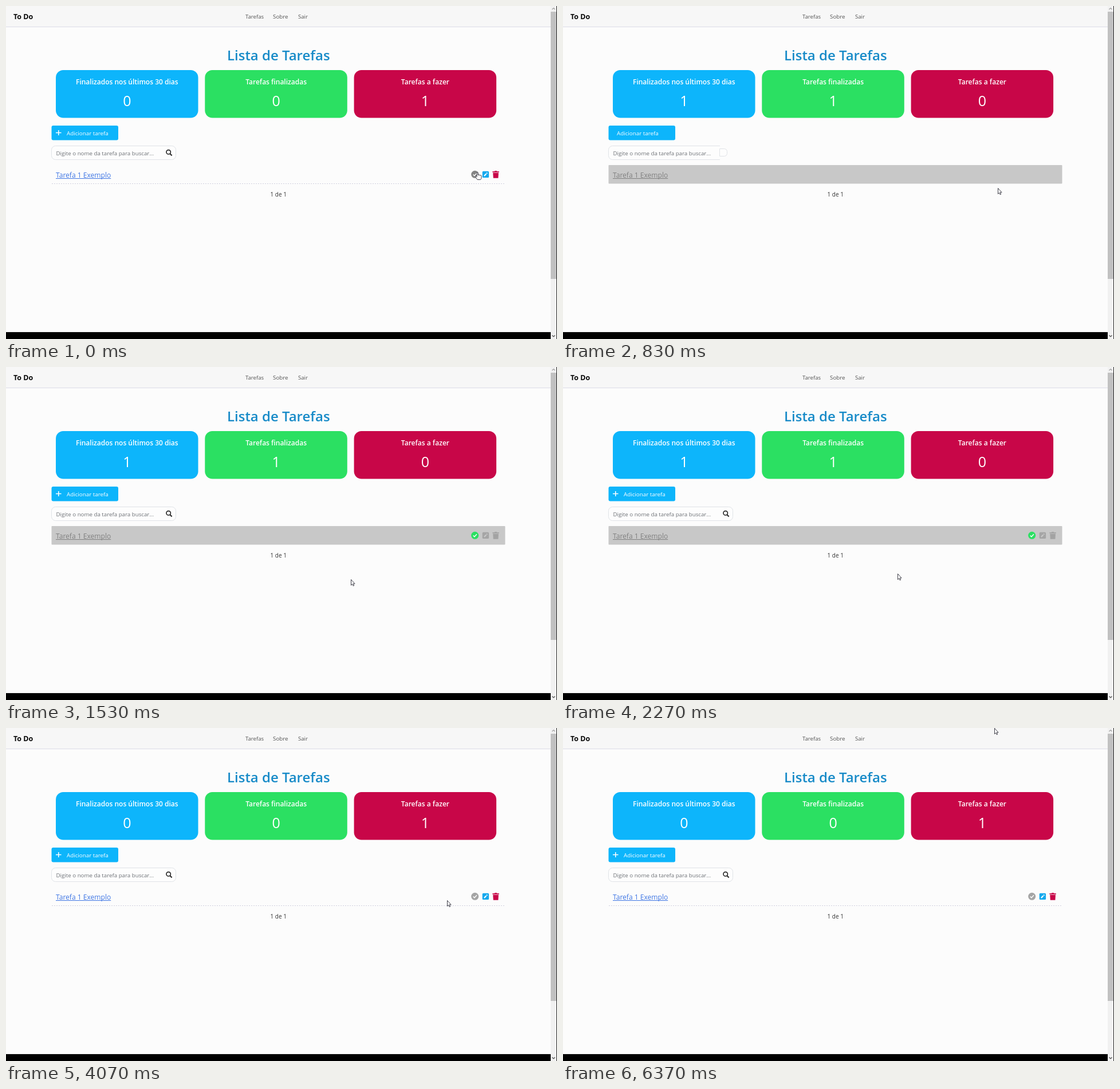
An HTML page with a canvas that plays this animation: 962 by 582 pixels, repeating every 7.41 s.

```html
<!DOCTYPE html>
<html lang="pt">
<head>
<meta charset="utf-8">
<title>To Do</title>
<style>
html, body { margin: 0; width: 100%; height: 100%; overflow: hidden; background: #fcfcfc; }
canvas { display: block; }
</style>
</head>
<body>
<canvas id="stage" width="962" height="582"></canvas>
<script>
const ctx = document.getElementById('stage').getContext('2d');
const LOOP = 7410;
const BLUE = '#0db5fb', GREEN = '#2be062', RED = '#c80648';

// Pointer path: time, x, y of the tip
const path = [
  [0, 823, 290], [30, 823, 290], [170, 819, 291], [600, 819, 291],
  [830, 759, 318], [1230, 623, 367], [1330, 609, 370], [1370, 609, 370],
  [1530, 602, 371], [2030, 602, 371], [2270, 584, 361], [2520, 612, 350],
  [2770, 712, 322], [2800, 716, 321], [3170, 818, 291], [3900, 818, 291],
  [4070, 770, 301], [4350, 684, 328], [4630, 642, 343], [4670, 642, 343],
  [4730, 639, 343], [4970, 639, 343], [5150, 690, 150], [5330, 753, 0],
  [LOOP, 753, 0]
];

function pointerAt(t) {
  let i = 1;
  while (i < path.length - 1 && path[i][0] <= t) i++;
  const [t0, x0, y0] = path[i - 1], [t1, x1, y1] = path[i];
  const k = (t - t0) / (t1 - t0);
  return [Math.round(x0 + (x1 - x0) * k), Math.round(y0 + (y1 - y0) * k)];
}

const within = (t, a, b) => t >= a && t < b;

function rect(x, y, w, h, color) {
  ctx.fillStyle = color;
  ctx.fillRect(x, y, w, h);
}

function box(x, y, w, h, r, fill, stroke) {
  ctx.beginPath();
  ctx.roundRect(x, y, w, h, r);
  if (fill) { ctx.fillStyle = fill; ctx.fill(); }
  if (stroke) { ctx.strokeStyle = stroke; ctx.lineWidth = 1; ctx.stroke(); }
}

function line(points, color, width) {
  ctx.beginPath();
  points.forEach(([x, y]) => ctx.lineTo(x, y));
  ctx.strokeStyle = color;
  ctx.lineWidth = width;
  ctx.stroke();
}

function circle(x, y, r) {
  ctx.beginPath();
  ctx.arc(x, y, r, 0, Math.PI * 2);
}

function text(str, x, y, size, color, weight = 400, align = 'left') {
  ctx.font = `${weight} ${size}px "Open Sans", "Noto Sans", sans-serif`;
  ctx.textAlign = align;
  ctx.fillStyle = color;
  ctx.fillText(str, x, y);
  return ctx.measureText(str).width;
}

function drawHeader() {
  rect(0, 0, 951, 36, '#f7f7f7');
  rect(0, 36, 951, 1, '#dcdce8');
  text('To Do', 13, 23, 12.5, '#080808', 700);
  text('Tarefas', 418, 22, 9.6, '#555');
  text('Sobre', 466, 22, 9.8, '#555');
  text('Sair', 510, 22, 9.6, '#555');
}

function drawCard(x, color, label, value) {
  box(x, 112, 248.5, 83.5, 13, color);
  text(label, x + 124.3, 137, 12, '#fff', 600, 'center');
  text(value, x + 124.3, 175, 25, '#fff', 400, 'center');
}

function drawButton(icons) {
  box(79.5, 209, 116.5, 25.5, 3, BLUE);
  text('Adicionar tarefa', icons ? 106 : 94, 225.5, 9.8, '#fff');
  if (icons) {
    line([[87, 221.5], [96.5, 221.5]], '#fff', 1.5);
    line([[91.75, 217], [91.75, 226]], '#fff', 1.5);
  }
}

function drawSearch(icons) {
  const edge = '#e0e3e7';
  if (icons) {
    box(79.5, 244.5, 217, 24, 7, '#fdfdfd', edge);
    circle(283.7, 255.3, 3.7);
    ctx.strokeStyle = '#2c2c2c';
    ctx.lineWidth = 1.7;
    ctx.stroke();
    line([[286.3, 258], [289.6, 261.4]], '#2c2c2c', 2.1);
  } else {
    ctx.save();
    ctx.beginPath();
    ctx.rect(70, 240, 204, 34);
    ctx.clip();
    box(79.5, 244.5, 217, 24, 7, '#fdfdfd', edge);
    ctx.restore();
    box(273.5, 249.5, 13, 13, [0, 5, 5, 0], '#fdfdfd', edge);
  }
  text('Digite o nome da tarefa para buscar...', 87.5, 260.5, 9.72, '#6d7176');
}

function drawRowIcons(done, hover) {
  const back = done ? '#c8c8c8' : '#fff';
  circle(818.7, 294.3, 6.5);
  ctx.fillStyle = done ? (hover ? '#20ab4c' : GREEN) : (hover ? '#858585' : '#a5a5a5');
  ctx.fill();
  line([[815.7, 294.5], [817.9, 296.7], [821.9, 292.3]], '#fff', 1.5);

  box(831.7, 288.7, 11.4, 11.4, 1.7, done ? '#a5a5a5' : '#14a9ee');
  line([[834.9, 296.9], [838.5, 293.3]], back, 2.1);
  line([[839.2, 292.6], [840.3, 291.5]], back, 2.1);

  const bin = done ? '#a3a3a3' : RED;
  rect(849.4, 289, 11.4, 1.7, bin);
  rect(853, 288.1, 4.2, 1.2, bin);
  ctx.beginPath();
  ctx.moveTo(850.2, 291.5);
  ctx.lineTo(860, 291.5);
  ctx.lineTo(859.4, 300.8);
  ctx.lineTo(850.8, 300.8);
  ctx.closePath();
  ctx.fillStyle = bin;
  ctx.fill();
}

function drawRow(done, icons, hover) {
  if (done) {
    box(79.5, 278, 792, 32.5, 1, '#c8c8c8');
  } else {
    ctx.setLineDash([2, 2]);
    line([[80, 310.5], [871, 310.5]], '#d0d0de', 1);
    ctx.setLineDash([]);
  }
  const color = done ? '#808080' : '#3f76e4';
  const width = text('Tarefa 1 Exemplo', 87, 299.5, 12.06, color);
  rect(87, 301, width, 1, color);
  if (icons) drawRowIcons(done, hover);
  text('1 de 1', 475.7, 333, 10, '#333', 400, 'center');
}

function drawFrame() {
  rect(0, 569, 951, 1, '#eeeeee');
  rect(0, 570, 951, 12, '#000');
  rect(951, 0, 10, 582, '#f1f1f1');
  rect(951, 10, 10, 467, '#c1c1c1');
  rect(961, 0, 1, 582, '#262626');
  line([[953.5, 6], [956, 3.5], [958.5, 6]], '#a0a0a0', 1.2);
  line([[953.5, 575.5], [956, 578], [958.5, 575.5]], '#505050', 1.2);
}

function drawShape(x, y, d) {
  ctx.save();
  ctx.translate(x, y);
  const shape = new Path2D(d);
  ctx.fillStyle = '#fff';
  ctx.fill(shape);
  ctx.strokeStyle = '#2d2d38';
  ctx.lineWidth = 0.9;
  ctx.lineJoin = 'round';
  ctx.stroke(shape);
  ctx.restore();
}

function drawPointer(x, y, hand) {
  drawShape(x, y, hand
    ? 'M-1 1Q0-.5 1 1V5.5Q2 4.3 3 5.6Q4.2 4.7 5 6Q7 5.2 7 7.5V10Q7 12 5.5 13.5H0L-3.5 8.5Q-3.8 6.8-2.3 7.2L-1 8.5Z'
    : 'M.5 .5V10.5L2.7 8.4L4.2 11.7L5.7 11L4.2 7.8H7.1Z');
}

function draw(t) {
  const done = within(t, 700, 3910);
  const icons = !within(t, 700, 870) && !within(t, 3910, 4030);
  const [x, y] = pointerAt(t);
  const hover = Math.hypot(x - 818.7, y - 294.3) < 7.5;

  rect(0, 0, 962, 582, '#fcfcfc');
  drawHeader();
  text('Lista de Tarefas', 475.8, 95, 24, '#188bc8', 600, 'center');
  const finished = done ? '1' : '0';
  drawCard(87, BLUE, 'Finalizados nos últimos 30 dias', finished);
  drawCard(347.3, GREEN, 'Tarefas finalizadas', finished);
  drawCard(607.6, RED, 'Tarefas a fazer', done ? '0' : '1');
  drawButton(icons);
  drawSearch(icons);
  drawRow(done, icons, hover);
  drawFrame();
  drawPointer(x, y, hover);
}

function tick() {
  draw(performance.now() % LOOP);
  requestAnimationFrame(tick);
}
tick();
</script>
</body>
</html>
```
